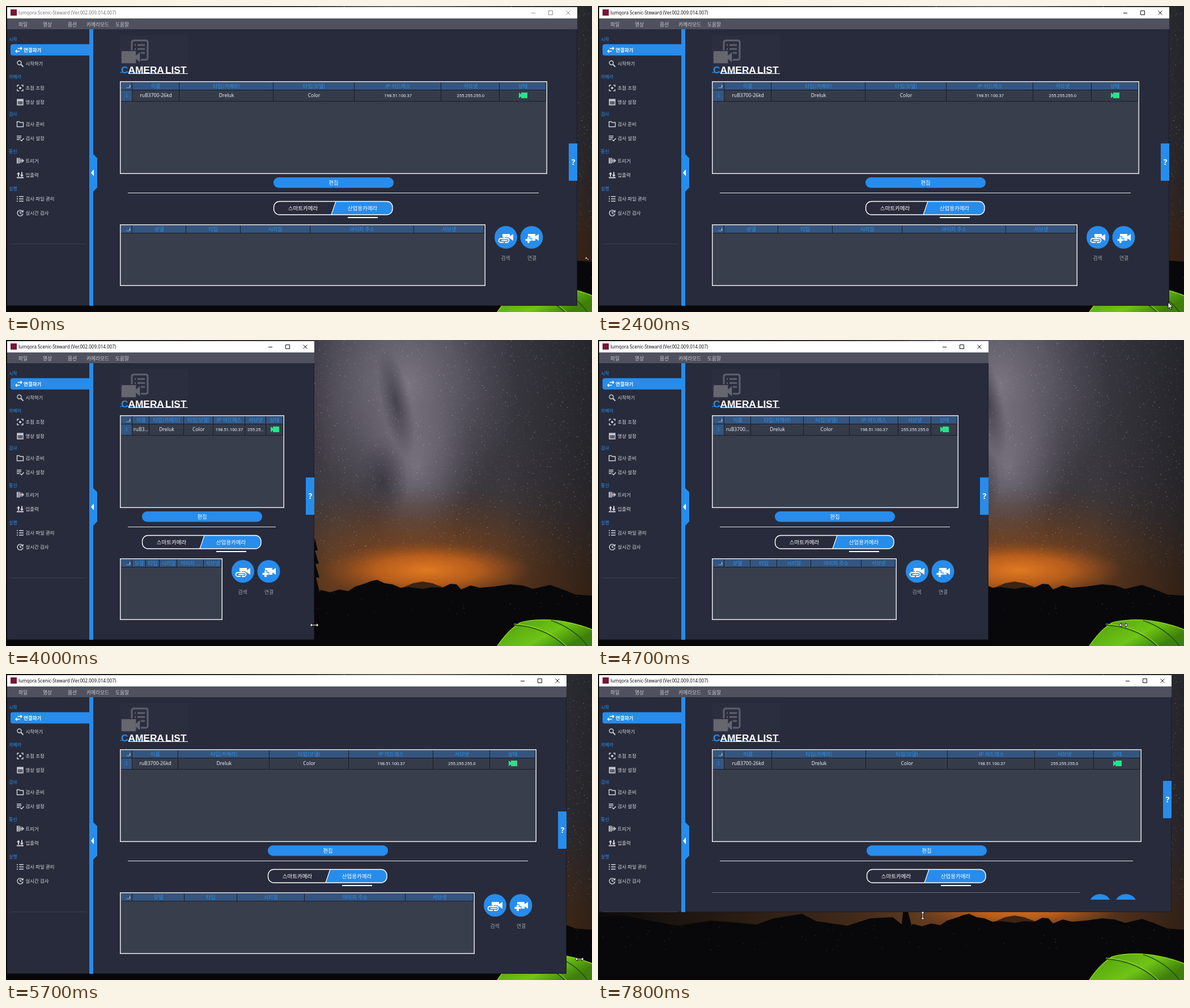
Animation, 1034 px wide and 541 px high, one loop 8 s. Source, as an HTML page:

```html
<!DOCTYPE html>
<html lang="ko">
<head>
<meta charset="utf-8">
<style>
html, body { margin: 0; width: 100%; height: 100%; overflow: hidden; background: #08090b; }
svg { display: block; width: 1034px; height: 541px; }
text { font-family: "Noto Sans CJK KR", "Noto Sans CJK", "Noto Sans", sans-serif; white-space: pre; }
.mid { text-anchor: middle; }
.num { font-family: Roboto, sans-serif; letter-spacing: -.15px; }
.ico { fill: none; stroke: #d3d6dc; stroke-width: 1.4; }
.solid { fill: #d3d6dc; stroke: none; }
</style>
</head>
<body>
<svg viewBox="0 0 1034 541">
  <defs>
    <linearGradient id="sky" x2="0" y2="1">
      <stop offset="0" stop-color="#403f49"/>
      <stop offset=".45" stop-color="#413e45"/>
      <stop offset=".66" stop-color="#4a3b33"/>
      <stop offset=".84" stop-color="#5a3519"/>
    </linearGradient>
    <linearGradient id="shade">
      <stop offset="0" stop-color="#050608" stop-opacity=".9"/>
      <stop offset=".42" stop-color="#08090c" stop-opacity=".3"/>
      <stop offset=".56" stop-color="#08090c" stop-opacity="0"/>
      <stop offset=".85" stop-color="#08090c" stop-opacity=".12"/>
      <stop offset="1" stop-color="#08090c" stop-opacity=".48"/>
    </linearGradient>
    <radialGradient id="milk">
      <stop offset="0" stop-color="#9c95a4" stop-opacity=".7"/>
      <stop offset=".5" stop-color="#8b8494" stop-opacity=".42"/>
      <stop offset="1" stop-color="#76707f" stop-opacity="0"/>
    </radialGradient>
    <radialGradient id="lane">
      <stop offset="0" stop-color="#2c2a33" stop-opacity=".6"/>
      <stop offset="1" stop-color="#2c2a33" stop-opacity="0"/>
    </radialGradient>
    <radialGradient id="haze">
      <stop offset="0" stop-color="#a3531a" stop-opacity=".8"/>
      <stop offset=".5" stop-color="#80441c" stop-opacity=".45"/>
      <stop offset="1" stop-color="#5a3a24" stop-opacity="0"/>
    </radialGradient>
    <radialGradient id="glow">
      <stop offset="0" stop-color="#e07a22"/>
      <stop offset=".5" stop-color="#cc661b" stop-opacity=".75"/>
      <stop offset="1" stop-color="#a0521a" stop-opacity="0"/>
    </radialGradient>
    <linearGradient id="tent" x2="1" y2=".5">
      <stop offset="0" stop-color="#3f8608"/>
      <stop offset=".3" stop-color="#5cae0e"/>
      <stop offset=".65" stop-color="#6fc416"/>
      <stop offset="1" stop-color="#3f800a"/>
    </linearGradient>
    <clipPath id="inner"><rect id="innerBox" x="2" y="41" width="1032" height="467"/></clipPath>
    <clipPath id="frame"><rect id="frameBox" x="2" y="2" width="1006" height="528"/></clipPath>
  </defs>

  <g id="photo">
    <rect width="1034" height="541" fill="url(#sky)"/>
    <ellipse cx="710" cy="80" rx="190" ry="240" fill="url(#milk)"/>
    <ellipse cx="725" cy="225" rx="100" ry="160" fill="url(#milk)" opacity=".75"/>
    <ellipse cx="688" cy="110" rx="26" ry="100" fill="url(#lane)" transform="rotate(-12 688 110)"/>
    <ellipse cx="665" cy="250" rx="45" ry="80" fill="url(#lane)"/>
    <ellipse cx="740" cy="395" rx="330" ry="135" fill="url(#haze)"/>
    <rect width="1034" height="541" fill="url(#shade)"/>
    <ellipse cx="742" cy="407" rx="185" ry="50" fill="url(#glow)"/>
    <path id="dim" stroke="#c9c5cf" stroke-opacity=".3"/>
    <path id="lit" stroke="#eeeaf0" stroke-opacity=".6"/>
    <path d="M690 442 718 430 735 427 752 430 790 444Z" fill="#3b2414"/>
    <path d="M0 430 40 426 70 432 140 445 200 436 250 440 280 443 310 432 360 424 385 437 440 445 480 432 520 430 545 450 556 442 572 446 588 441 604 444 616 436 632 431 645 426 655 424 668 430 682 432 696 438 712 437 735 440 752 437 770 438 784 431 795 432 803 441 820 434 836 438 860 436 890 432 912 434 930 440 960 433 980 440 1005 450 1034 452V541H0Z" fill="#08080a"/>
    <path d="M545 350 550 372 545 372 552 395 546 396 553 420 547 420 555 452H535Z" fill="#08080a"/>
    <path id="lamps" stroke="#b07a3a" stroke-opacity=".5"/>
    <path d="M867 541Q886 513 907 500 925 494 960 495 1000 498 1034 512V541Z" fill="url(#tent)"/>
    <path d="M867 541Q886 513 907 500 925 494 960 495 1000 498 1034 512" fill="none" stroke="#8fd424" stroke-width="1.5"/>
    <path d="M896 504Q950 507 986 541M962 496Q1003 510 1026 541" fill="none" stroke="#24520a" stroke-width="1.6"/>
    <path d="M896 502Q953 505 989 541" fill="none" stroke="#a5df3c"/>
  </g>

  <g clip-path="url(#frame)">
    <rect x="2" y="2" width="1032" height="20" fill="#fff"/>
    <rect x="2" y="22" width="1032" height="19" fill="#4f525e"/>
    <rect x="2" y="41" width="1032" height="500" fill="#282b3b"/>
    <path id="edge" fill="none" stroke="#191b25"/>
    <rect x="8" y="6" width="11" height="11" fill="#7a1536"/>
    <text id="title" x="22" y="15" style="font-family:'Noto Sans',sans-serif;font-size:8px">lumqora Scenic-Steward (Ver.002.009.014.007)</text>
    <g id="menu" fill="#c9cbd1" font-size="8.7"></g>

    <path d="M8.5 420.5H141" stroke="#3a3e4d"/>
    <path d="M147 67.5H12Q8 67.5 8 71.5V83.5Q8 87.5 12 87.5H147Z" fill="#278ceb"/>
    <path d="M147 41H154V262L161 269V321L154 328V530H147Z" fill="#278ceb"/>
    <path d="M155 289V301L150 295Z" fill="#fff"/>
    <g id="side"></g>

    <rect x="201" y="52" width="120" height="69" fill="#2b2e3f"/>
    <rect x="222" y="61" width="28" height="34" rx="3" fill="none" stroke="#5f606c" stroke-width="3"/>
    <path d="M227 69H229M232 69H245M227 76H229M232 76H245M238 83H245" stroke="#5f606c" stroke-width="3"/>
    <path d="M203 79H230V86L237 80V101L230 95V102H203Z" fill="#66666f" stroke="#2b2e3f" stroke-width="1.5"/>
    <path d="M201 117.5H262" stroke="#278ceb"/>
    <path d="M216 119.5H321" stroke="#fff"/>
    <text x="203" y="119" fill="#fff" style="font:bold 17.3px 'Liberation Sans',sans-serif;word-spacing:-2px"><tspan fill="#278ceb">C</tspan>AMERA LIST</text>

    <g id="upper"></g>
    <path id="rule" stroke="#e6e8ec"/>
    <g id="center" class="mid" fill="#fff">
      <rect x="472" y="303" width="212" height="18.5" rx="9" fill="#278ceb"/>
      <text x="578" y="316" font-size="9.3" font-weight="500">편집</text>
      <path d="M582 345.5H671Q682 346 682 357.5T671 369H574Z" fill="#278ceb"/>
      <rect x="472.5" y="345.5" width="209.5" height="23.5" rx="10" fill="none" stroke="#fff" stroke-width="1.4"/>
      <path d="M582 345.5 574 369" stroke="#fff" stroke-width="1.2"/>
      <rect x="603" y="373" width="53" height="2"/>
      <text x="524" y="360.5" font-size="9.5" font-weight="500">스마트카메라</text>
      <text x="629" y="360.5" font-size="9.5" font-weight="500">산업용카메라</text>
    </g>
    <g clip-path="url(#inner)">
      <g id="lower"></g>
      <g class="right">
        <circle cx="882" cy="409" r="20" fill="#278ceb"/>
        <circle cx="927.5" cy="409" r="20" fill="#278ceb"/>
        <path id="cam" d="M876 403H889V407L895 403V415L889 411V415H876Z" fill="#fff"/>
        <use href="#cam" x="45"/>
        <g fill="none" stroke-width="1.8">
          <path d="M878 411H873A3.5 3.5 0 0 0 873 418H878M880 411H884A3.5 3.5 0 0 1 884 418H880M874 414.5H884" stroke="#278ceb" stroke-width="4.5"/>
          <path d="M878 411H873A3.5 3.5 0 0 0 873 418H878M880 411H884A3.5 3.5 0 0 1 884 418H880M874 414.5H884" stroke="#fff"/>
          <path d="M922 407V420M915.5 413.5H928.5" stroke="#278ceb" stroke-width="6"/>
          <path d="M922 408V419M916.5 413.5H927.5" stroke="#fff" stroke-width="3.6"/>
        </g>
        <g class="mid" fill="#a0a2aa" font-size="8.8">
          <text x="881.5" y="448.5">검색</text>
          <text x="928" y="448.5">연결</text>
        </g>
      </g>
    </g>
    <g class="right">
      <path id="controls" d="M927 12.5H934M957.5 8.5H964.5V15.5H957.5ZM988.5 8.5 995.5 15.5M995.5 8.5 988.5 15.5" fill="none"/>
      <g id="help">
        <rect x="993" y="-33" width="15" height="66" fill="#278ceb"/>
        <text x="1001" y="5" class="mid" fill="#fff" style="font:bold 14px 'Open Sans',sans-serif">?</text>
      </g>
    </g>
  </g>

  <path id="spark" d="M1023 445 1026 447M1025 445H1023V447M1026 448H1028" stroke="#e8e8e8" fill="none"/>
  <g id="cursor" fill="#fff" stroke="#000" stroke-width=".9">
    <path id="arrow" d="M0 0V11L2.6 8.6 4.4 12.7 6.2 12 4.4 8H8Z"/>
    <path id="sizer" d="M-7.5 0-4-3.7V-1H4V-3.7L7.5 0 4 3.7V1H-4V3.7Z"/>
  </g>
</svg>
<script>
const $ = id => document.getElementById(id);
const set = (id, attrs) => { for (const k in attrs) $(id).setAttribute(k, attrs[k]); };
const label = (x, y, s, extra = '') => `<text x="${x}" y="${y}" ${extra}>${s}</text>`;

// Stars over the open part of the sky, and small lights below the ridge
let seed = 11;
const rnd = () => (seed = seed * 16807 % 2147483647) / 2147483647;
const dots = (n, x0, y0, y1) => Array.from({ length: n }, () =>
  `M${(x0 + rnd() * (1034 - x0)).toFixed(1)} ${(y0 + rnd() * (y1 - y0)).toFixed(1)}h1`).join('');
set('dim', { d: dots(2200, 540, 0, 400) });
set('lit', { d: dots(260, 540, 0, 370) });
set('lamps', { d: dots(70, 0, 445, 490) });

$('menu').innerHTML = [[22, '파일'], [65, '영상'], [109, '옵션'], [142, '카메라모드'], [193, '도움말']]
  .map(([x, s]) => label(x, 35.5, s)).join('');

const sections = [[59, '시작'], [125, '카메라'], [191, '검사'], [257, '통신'], [323, '실행']];
const items = [
  [102, '시작하기', '<circle cx="-1.5" cy="-1.5" r="3.5"/><path d="M1 1 5.5 5.5" stroke-width="1.8"/>'],
  [145, '초점 조정', '<path d="M-5-2V-5H-2M2-5H5V-2M5 2V5H2M-2 5H-5V2"/><circle r="2" class="solid"/>'],
  [170, '영상 설정', '<rect x="-5" y="-5" width="10" height="10"/><path d="M-5-3H5" stroke-width="2.5"/><path d="M-4 0H4M-4 3H4" stroke-width="1.5" stroke-dasharray="1.5 1"/>'],
  [209, '검사 준비', '<path d="M-5.5 4.5V-4.5H-1.5L0-3H5.5V4.5Z"/>'],
  [234, '검사 설정', '<path d="M-6-4H2M-6-1H2M-6 2H-1M0 2 2.5 4.5 6.5 0"/>'],
  [273.5, '트리거', '<path d="M-5-5V5M-2-5V5" stroke-width="2"/><path d="M0 0H5M3-3 6 0 3 3M1-4V4"/>'],
  [298.5, '입출력', '<path d="M-3 3V-3M3-5V1M-6 5H6" stroke-width="2"/><path class="solid" d="M-6-1H0L-3-5ZM0 0H6L3 4Z"/>'],
  [341, '검사 파일 관리', '<path d="M-6-4H-4M-6 0H-4M-6 4H-4M-2-4H6M-2 0H6M-2 4H6"/>'],
  [366, '실시간 검사', '<path d="M4-3A5 5 0 1 0 5 1M5-5V-2H2M0-3V0L2.5 1.5"/>'],
];
$('side').innerHTML =
  sections.map(([y, s]) => label(5, y + 3, s, 'fill="#2f92ee" font-size="8"')).join('') +
  label(31, 81, '연결하기', 'fill="#fff" font-size="8.5" font-weight="700"') +
  '<path transform="translate(22.5 77.5)" d="M-2-2.5H5M3-5 5.5-2.5 3 0M2 2.5H-5M-3 0-5.5 2.5-3 5" fill="none" stroke="#fff" stroke-width="1.3"/>' +
  items.map(([y, s, icon]) => `<g class="ico" transform="translate(25 ${y})">${icon}</g>` +
    label(34.5, y + 3.2, s, 'fill="#d9dbe0" font-size="8.4"')).join('');

// Tables
const pen = document.createElement('canvas').getContext('2d');
function elide(s, room, font) {
  pen.font = font;
  const fits = v => pen.measureText(v).width <= room;
  if (fits(s)) return s;
  while (s && !fits(s + '...')) s = s.slice(0, -1);
  return s + '...';
}

const upperCols = [['이름', 11.4], ['타입(카메라)', 22.7], ['타입(모델)', 19.6], ['IP 어드레스', 21], ['서브넷', 14.1], ['상태', 11.2]];
const lowerCols = [['모델', 15.3], ['타입', 15.4], ['시리얼', 19.8], ['아이피 주소', 29.5], ['서브넷', 20]];
const cells = ['ruB3700-26kd', 'Dreluk', 'Color', '198.51.100.37', '255.255.255.0'];

function table(right, top, bottom, cols, row) {
  if (bottom - top < 3)
    return `<path d="M201 ${top + .5}H${right}" stroke="#a9acb5" stroke-dasharray="1 1"/>`;
  const rect = (x, y, w, h, fill) => `<rect x="${x}" y="${y}" width="${w}" height="${h}" fill="${fill}"/>`;
  const sum = cols.reduce((a, c) => a + c[1], 0), room = right - 225, h = Math.min(13, bottom - top - 2);
  let out = rect(201, top, right - 201, bottom - top, '#393e4d') + rect(203, top + 2, right - 205, h, '#34557f');
  if (row) out += rect(203, top + 15, right - 205, 21, '#363b4a') + rect(203, top + 16, 19, 19, '#34557f') +
    label(212.5, top + 28, '1', 'class="mid" fill="#2f92ee" font-size="8.5"');
  for (let i = 0; i < 4; i++)
    out += `<path d="M${212 + 2 * i} ${top + 11.5}h1m${i ? 0 : 5} ${-2 * (i > 1)}h1" stroke="#aab4c4"/>`;
  out += `<path d="M218.5 ${top + 6}V${top + 12}" stroke="#aab4c4"/>`;
  let x = 223, lines = `M222.5 ${top + 2}v${row ? 34 : h}`;
  cols.forEach(([name, part], i) => {
    const w = room * part / sum, cx = x + w / 2;
    out += label(cx, top + 11.5, elide(name, w - 4, '9px "Noto Sans CJK KR", sans-serif'), 'class="mid" fill="#2f92e6" font-size="9"');
    if (row && i < 5) {
      const digits = i > 2, size = digits ? 7.9 : 8.6;
      const face = digits ? 'Roboto, sans-serif' : "'Noto Sans', sans-serif";
      out += label(cx, top + 28, elide(cells[i], w - 4, `${size}px ${face}`),
        `class="mid${digits ? ' num' : ''}" fill="#eceef2" style="font-size:${size}px;font-family:${face}"`);
    } else if (row) {
      const l = Math.round(cx) - 7;
      out += `<path d="M${l} ${top + 20}l4 3v-3h11v10h-11v-3l-4 3z" fill="#25e48c"/>`;
    }
    x += w;
    lines += `M${Math.round(x) - .5} ${top + 2}v${row ? 34 : h}`;
  });
  lines += `M203 ${top + 15.5}H${right - 2}`;
  if (row) lines += `M203 ${top + 35.5}H${right - 2}`;
  return out + `<path d="${lines}" stroke="#191c28" fill="none"/>` +
    `<rect x="201.75" y="${top + .75}" width="${right - 202.5}" height="${bottom - top - 1.5}" fill="none" stroke="#e8eaee" stroke-width="1.5"/>`;
}

// Motion: [ms, values...]
const widths = [[3100, 1008], [3200, 930], [3400, 826], [3600, 690], [3800, 580], [4000, 544], [4200, 544], [4300, 556],
  [4700, 689], [5000, 880], [5100, 880], [5200, 910], [5400, 960], [5600, 960], [5700, 989], [5900, 1008], [6000, 1012]];
const heights = [[6900, 530], [7000, 518], [7500, 421]];
const pointer = [[100, 1022, 444, 'a'], [800, 1008, 516, 'a'], [900, 1009, 527, 'h'], [1400, 1009, 527, 'h'], [1500, 1009, 528, 'h'],
  [1800, 1009, 528, 'h'], [1900, 1010, 527, 'a'], [2200, 1006, 524, 'a'], [2400, 1006, 524, 'a'], [2500, 1008, 518, 'h'], [2600, 1008, 512, 'h'],
  [2800, 1008, 512, 'h'], [3000, 856, 510, 'h'], [3100, 856, 510, 'h'], [3400, 608, 507, 'h'], [3600, 560, 505, 'h'], [4000, 544, 504, 'h'],
  [4200, 544, 504, 'h'], [4700, 927, 504, 'h'], [5000, 1012, 504, 'h'], [5700, 1012, 504, 'h'], [5800, 960, 515, 'a'],
  [6000, 590, 536, 'v'], [6400, 590, 536, 'v'], [6500, 590, 530, 'v'], [6700, 588, 530, 'v'], [6900, 588, 530, 'v'],
  [7500, 573, 405, 'v'], [7700, 573, 405, 'v'], [7800, 573, 427, 'v']];

function at(keys, t) {
  if (t <= keys[0][0]) return keys[0].slice(1);
  const i = keys.findIndex(k => k[0] > t);
  if (i < 0) return keys[keys.length - 1].slice(1);
  const a = keys[i - 1], b = keys[i], p = (t - a[0]) / (b[0] - a[0]);
  return a.slice(1).map((v, j) => typeof v === 'number' ? v + (b[j + 1] - v) * p : v);
}

function layout(w, h) {
  const dx = w - 1008;
  set('frameBox', { width: w - 2, height: h - 2 });
  set('innerBox', { height: Math.max(0, h - 22 - 41) });
  document.querySelectorAll('.right').forEach(g => g.setAttribute('transform', `translate(${dx} 0)`));
  set('center', { transform: `translate(${Math.floor(dx / 2)} 0)` });
  set('help', { transform: `translate(0 ${Math.floor(h / 2 + 11.5)})` });
  set('rule', { d: `M215 330.5H${w - 68}` });
  set('edge', { d: `M2 ${h - .5}H${w - .5}V41` });
  $('upper').innerHTML = table(w - 53, 133, 297, upperCols, true);
  $('lower').innerHTML = table(w - 162, 386, Math.max(386, h - 35), lowerCols, false);
}

let last = '';
function draw(ms) {
  const t = Math.floor(ms % 8000 / 100) * 100;
  const w = Math.round(at(widths, t)[0]), h = Math.round(at(heights, t)[0]);
  if (last !== w + 'x' + h) { layout(w, h); last = w + 'x' + h; }
  const active = t >= 600;
  set('title', { fill: active ? '#111' : '#777' });
  set('controls', { stroke: active ? '#111' : '#8a8a8a' });
  const [x, y, kind] = at(pointer, t);
  set('spark', { visibility: t < 100 ? 'visible' : 'hidden' });
  set('cursor', { transform: `translate(${Math.round(x)} ${Math.round(y)})`, visibility: t < 100 ? 'hidden' : 'visible' });
  set('arrow', { display: kind === 'a' ? 'inline' : 'none' });
  set('sizer', { display: kind === 'a' ? 'none' : 'inline', transform: kind === 'v' ? 'rotate(90)' : '' });
}

const start = performance.now();
function tick() {
  draw(performance.now() - start);
  requestAnimationFrame(tick);
}
tick();
</script>
</body>
</html>
```
